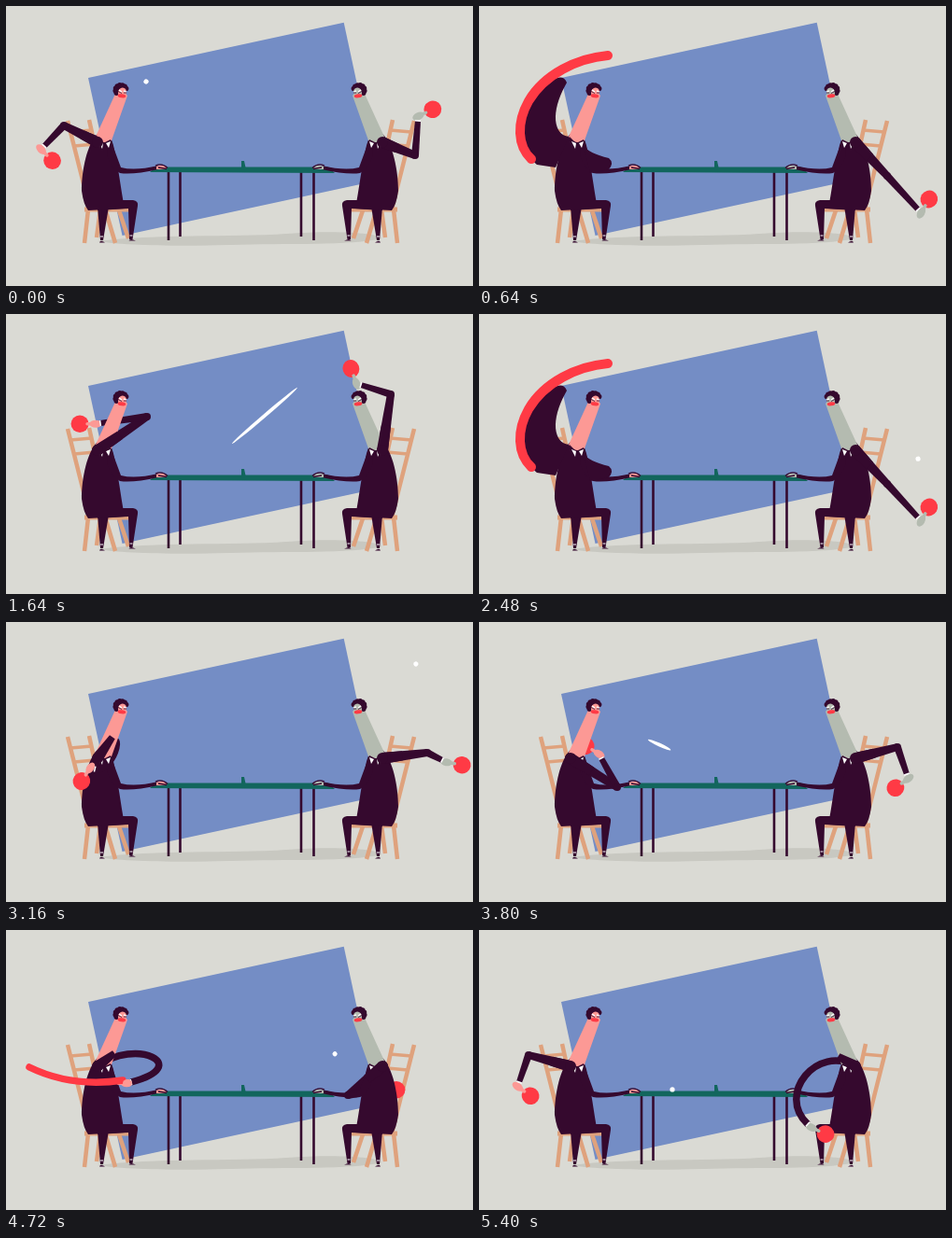
An HTML page with a canvas for the animation above (5440 ms loop, 500x300 px).

```html
<!DOCTYPE html>
<html>
<head>
<meta charset="utf-8">
<style>
html, body { margin: 0; width: 100%; height: 100%; overflow: hidden; background: #dadad4; }
canvas { display: block; }
</style>
</head>
<body>
<canvas id="stage" width="500" height="300"></canvas>
<script>
const ctx = document.getElementById('stage').getContext('2d');
const LOOP = 5440, RALLY = LOOP / 3, STEP = 40;
const SUIT = '#35092e', RED = '#ff3a45', WOOD = '#dfa27d', GREEN = '#12665d', WHITE = '#fff';
const SHOULDER = [98, 146];

// Poses shared by both players, facing right: elbow, wrist, paddle angle, curved arm.
const poses = {
  cock: [62, 128, 41, 150, 45, 0],
  hang: [53, 134, 43, 163, 36, 0],
  guard: [148, 177, 131, 146, 212, 0],
  wide: [50, 140, 34, 148, 170, 0],
  low: [64, 182, 31, 218, 240, 0],
  lift: [63, 160, 60, 123, 205, 0],
  cross: [151, 110, 101, 117, 180, 0],
  smash: [89, 86, 121, 76, 290, 0],
  dig: [161, 149, 149, 208, 155, 1],
  sweep: [170, 130, 134, 163, 180, 1],
  tuck: [135, 177, 105, 172, 180, 0]
};
const leftCues = {
  0: 'cock', 150: 'guard', 400: 'wide', 600: 'wide', 640: 'smash',
  1030: 'wide', 1075: 'sweep', 1500: 'cock', 1620: 'cross', 1760: 'hang'
};
const rightCues = {
  0: 'lift', 150: 'hang', 380: 'guard', 610: 'low', 850: 'guard',
  1075: 'tuck', 1250: 'wide', 1600: 'smash', 1760: 'dig'
};
// Hits, bounces and turning points of the ball: time, x, y.
const rally = [
  [0, 150, 81], [130, 115, 125], [150, 179, 129], [300, 270, 171], [385, 356, 140],
  [510, 190, 171], [620, 125, 90], [666, 470, 155], [760, 478, 200], [900, 200, 171],
  [1070, 128, 162], [1093, 352, 133], [1350, 440, 45], [1600, 347, 51],
  [1680, 207, 171], [1774, 207, 171]
];

const mix = (a, b, u) => a + (b - a) * u;
const during = (t, a, b) => t >= a && t < b;

function span(keys, t) {
  const i = keys.findLastIndex(k => k[0] <= t);
  const a = keys[i], b = keys[(i + 1) % keys.length];
  const time = (b[0] > a[0] ? b[0] : RALLY) - a[0];
  return { a, b, time, u: (t - a[0]) / time };
}

// Each pose is held for a third of its time, then eases into the next.
function armPose(cues, t) {
  const keys = Object.entries(cues).map(([time, name]) => [+time, name]);
  const { a, b, u } = span(keys, t);
  const v = Math.max(0, (u - .35) / .65), ease = v * v * (3 - 2 * v);
  return poses[a[1]].map((n, i) => mix(n, poses[b[1]][i], ease));
}

function poly(color, ...p) {
  ctx.fillStyle = color;
  ctx.beginPath();
  for (let i = 0; i < p.length; i += 2) ctx.lineTo(p[i], p[i + 1]);
  ctx.fill();
}
function shape(color, d) {
  ctx.fillStyle = color;
  ctx.fill(new Path2D(d));
}
function line(color, width, d, cap = 'butt') {
  ctx.strokeStyle = color;
  ctx.lineWidth = width;
  ctx.lineCap = cap;
  ctx.stroke(new Path2D(d));
}
function oval(color, x, y, rx, ry = rx, turn = 0) {
  ctx.fillStyle = color;
  ctx.beginPath();
  ctx.ellipse(x, y, rx, ry, turn, 0, 7);
  ctx.fill();
}
function limb(x1, y1, w1, x2, y2, w2) {
  const turn = Math.atan2(y2 - y1, x2 - x1), c = Math.cos(turn) / 2, s = Math.sin(turn) / 2;
  poly(SUIT, x1 - s * w1, y1 + c * w1, x1 + s * w1, y1 - c * w1,
    x2 + s * w2, y2 - c * w2, x2 - s * w2, y2 + c * w2);
  oval(SUIT, x1, y1, w1 / 2);
}
function mirrored(width, paint) {
  ctx.save();
  ctx.translate(width, 0);
  ctx.scale(-1, 1);
  paint();
  ctx.restore();
}

function room() {
  poly('#dadad4', 0, 0, 500, 0, 500, 300, 0, 300);
  poly('#748dc5', 88, 77, 361.7, 17.8, 398, 187, 124.5, 246);
  shape('#c8c8c1', 'M98 252C160 244 240 248 300 244S400 244 402 249C370 257 300 254 240 256S120 256 98 252Z');
}

function table() {
  line(SUIT, 2.6, 'M174 177V251M186.5 177V247M316 177V247M329.5 177V251');
  poly(GREEN, 154, 178, 161, 172.5, 345, 172.5, 352, 179);
  poly(GREEN, 252, 166, 255, 166, 256.5, 173, 252, 173);
}

function chair() {
  line(WOOD, 4.5, 'M66 123L90 218M89 122L104 190M88 218L84 254M101 218L97 248M106 217L117 254M120 216L131 249');
  line(WOOD, 3.5, 'M69 135L92 133M73 150L95 148');
  line(WOOD, 5, 'M84 218H133');
}

function body() {
  shape(SUIT, 'M98 137C87 147 81 176 81 198Q83 213 88 219L127 217C123 197 120 170 116 154Q114 143 111 141Z');
  poly(SUIT, 98, 215, 110, 215, 104, 251, 101, 251);
  shape(SUIT, 'M98 208L136 208Q142 209 141 214L135.5 250H132L131 217L98 219Z');
  line(WHITE, 1.2, 'M101 247H104M132.5 246H135.5');
  shape(SUIT, 'M100 253.5Q101 250 106 253.5ZM131.5 251.5Q133 248.5 139 251.5Z');
}

function restingArm(skin) {
  shape(SUIT, 'M109 147Q114 146 116 154L123 173Q138 177 163 171V175Q136 181 122 179Q113 175 108 160Z');
  shape(skin, 'M161 172Q167 169 172 173L171 175H161Z');
  line(SUIT, 1.3, 'M160 171Q167 168 173 173.5M163 173L172 174.5');
}

function head(skin) {
  shape(skin, 'M118 92Q124 89 130 96L113 144Q104 150 96 140Z');
  for (let i = 0; i < 8; i++) {
    const a = 2.5 + i * .5;
    oval(SUIT, 123 + 6 * Math.cos(a), 90 + 5.5 * Math.sin(a), 2.6);
  }
  oval(SUIT, 121, 89, 5);
  oval(skin, 124.5, 92.5, 4.5, 5, .3);
  line(WHITE, 1.5, 'M121 90L124 92M126 91L128.5 92');
  line(SUIT, .8, 'M120 91.5L124 93.5M126 93H129');
  oval(RED, 124, 96.3, 4.3, 2, .15);
}

function collar() {
  poly(SUIT, 97, 140, 104, 147, 112, 143, 114, 151, 98, 150);
  poly(WHITE, 99, 145, 104, 147, 103, 153);
  poly(WHITE, 107, 147, 112, 145, 110, 152);
  poly(SUIT, 104, 148, 107, 148, 107, 156, 104, 156);
}

// Upper control point of a curved arm and its opposite.
function bend([ex, ey, wx, wy]) {
  const turn = Math.atan2(wy - SHOULDER[1], wx - SHOULDER[0]);
  const dx = 35 * Math.cos(turn), dy = 35 * Math.sin(turn);
  return [ex - dx, ey - dy, ex + dx, ey + dy];
}

function arm(pose, skin, showPaddle) {
  const [ex, ey, wx, wy, tilt, curved] = pose;
  const controls = bend(pose), round = curved > .5;
  const reach = round ? Math.atan2(wy - controls[3], wx - controls[2]) : Math.atan2(wy - ey, wx - ex);
  const hx = wx + 5 * Math.cos(reach), hy = wy + 5 * Math.sin(reach);
  const turn = tilt * Math.PI / 180, dx = Math.cos(turn), dy = Math.sin(turn);
  if (showPaddle) {
    const edgeOn = Math.max(0, Math.min(1, (75 - hy) / 6));
    oval(RED, hx + 17 * dx, hy + 17 * dy, 9.5, 9.2 - 4 * edgeOn, turn);
  }
  line(skin, 3.5, `M${hx} ${hy}L${hx + 9 * dx} ${hy + 9 * dy}`, 'round');
  oval(skin, hx, hy, 6.5, 4, turn);
  if (round) {
    line(SUIT, 7.5, `M${SHOULDER}C${controls} ${wx} ${wy}`);
  } else {
    limb(...SHOULDER, 12, ex, ey, 8);
    limb(ex, ey, 8, wx, wy, 6);
  }
  const px = 3 * Math.sin(reach), py = 3 * Math.cos(reach);
  line(WHITE, 1.5, `M${wx - px} ${wy + py}L${wx + px} ${wy - py}`);
}

// The part of the arm that passes in front of the neck.
function upperArm(pose) {
  const [ex, ey] = pose[5] > .5 ? bend(pose) : pose;
  limb(...SHOULDER, 12, mix(SHOULDER[0], ex, .45), mix(SHOULDER[1], ey, .45), pose[5] > .5 ? 7 : 10);
}

function overheadSmear() {
  shape(SUIT, 'M94 82Q91 75 84 77C62 84 46 105 46 132Q47 158 62 170L82 173L96 140C80 138 76 114 93 84Z');
  shape(SUIT, 'M112 150Q118 158 139 163Q145 168 139 175L119 179Z');
  line(RED, 10, 'M138 53C105 56 70 73 53 102C40 125 41 150 56 164', 'round');
}

function player(pose, skin, { tucked, overhead, sweep }) {
  if (tucked) arm(pose, skin, true);
  body();
  restingArm(skin);
  if (overhead) overheadSmear();
  else if (!tucked) arm(pose, skin, !sweep);
  head(skin);
  collar();
  if (!overhead) upperArm(pose);
  if (sweep) {
    line(RED, 7.5, 'M25 147Q70 169 125 161', 'round');
    oval(skin, 130, 164, 5, 4);
  }
}

// Fast flight stretches the ball; a hard hit makes it vanish for a moment.
function ball(t) {
  const { a, b, u, time } = span(rally, t);
  const dx = b[1] - a[1], dy = b[2] - a[2], speed = Math.hypot(dx, dy) / time;
  if (speed > 3) return;
  const lift = time * time / 3000 * 4 * u * (1 - u);
  const streak = speed > .55;
  oval(WHITE, a[1] + dx * u, a[2] + dy * u - lift,
    streak ? speed * 20 : 2.6, streak ? 1.9 : 2.6, Math.atan2(dy, dx));
}

function draw(now) {
  const t = (Math.floor(now % LOOP / STEP) * STEP) % RALLY;
  room();
  chair();
  mirrored(503, chair);
  table();
  player(armPose(leftCues, t), '#fc9995', {
    overhead: during(t, 610, 685),
    sweep: during(t, 1075, 1120)
  });
  mirrored(501, () => player(armPose(rightCues, t), '#b4bbb0', {
    tucked: during(t, 1000, 1180)
  }));
  ball(t);
}

const start = performance.now();
function tick() {
  draw(performance.now() - start);
  requestAnimationFrame(tick);
}
tick();
</script>
</body>
</html>
```
